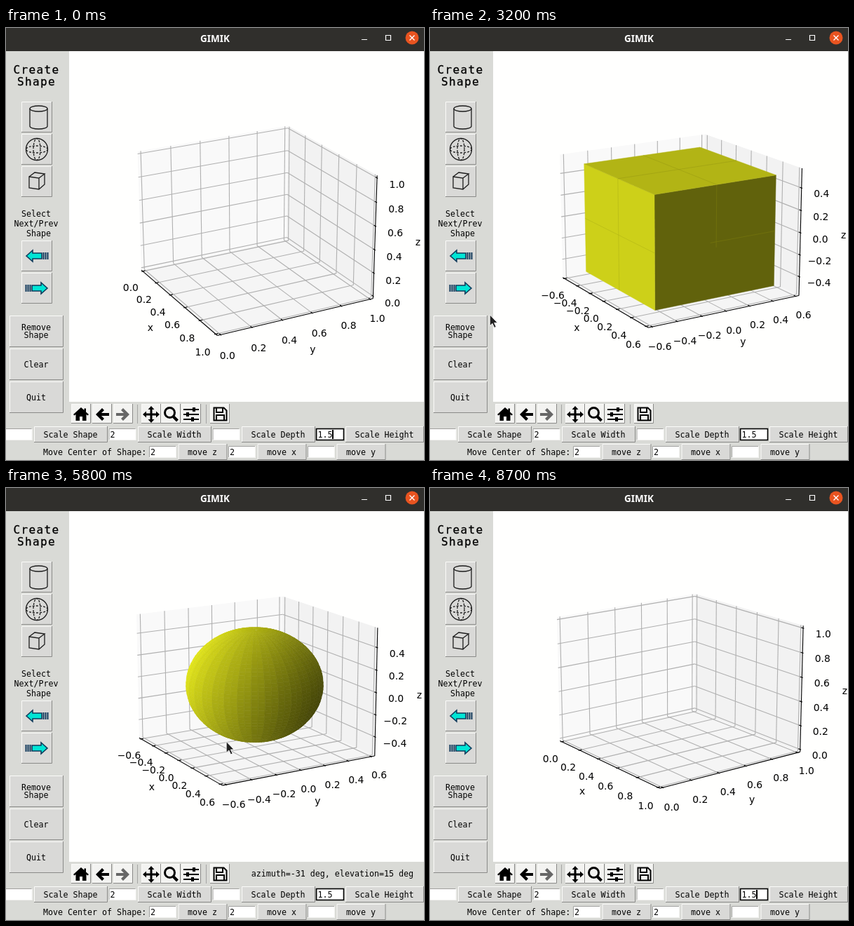
These frames come from a looping animation (596 px wide and 616 px high, 9100 ms). An HTML page with a canvas:

```html
<!DOCTYPE html>
<html lang="en">
<head>
<meta charset="utf-8">
<title>GIMIK</title>
<style>
  html, body { margin: 0; width: 100%; height: 100%; overflow: hidden; background: #d9dad6; }
  canvas, svg { position: absolute; left: 0; top: 0; }
  canvas { left: 90px; top: 33px; }
  text { font: 11.65px "DejaVu Sans Mono", monospace; white-space: pre; fill: #000; }
  .title { font: bold 13.5px "Noto Sans", sans-serif; fill: #fff; }
  .head { font-size: 16px; letter-spacing: 1.37px; stroke: #000; stroke-width: .3; }
  .icon { fill: none; stroke: #1c1c1c; stroke-width: 1.3; }
  .bold { fill: none; stroke: #000; stroke-width: 2; }
</style>
</head>
<body>
<canvas id="plot" width="506" height="500"></canvas>
<svg id="ui" width="596" height="616">
  <rect width="596" height="33" fill="#302f2c"/>
  <text class="title" x="298" y="20" text-anchor="middle">GIMIK</text>
  <path d="M507 16.5h8M541.5 10.5h7v7h-7z" fill="none" stroke="#fff" stroke-width="1.2"/>
  <circle cx="579" cy="14" r="9.5" fill="#e95420"/>
  <path d="M575.5 10.5l7 7m0-7l-7 7" stroke="#fff" stroke-width="1.4"/>
  <g id="widgets"></g>
  <g class="icon">
    <ellipse cx="46.5" cy="115" rx="12.5" ry="4"/>
    <path d="M34 115v25a12.5 4 0 0 0 25 0v-25"/>
    <circle cx="44" cy="173" r="15.5"/>
    <g stroke-dasharray="3 2">
      <ellipse cx="44" cy="173" rx="15.5" ry="5"/>
      <ellipse cx="44" cy="173" rx="5" ry="15.5"/>
    </g>
    <path d="M33 212l14 2v16l-14-2zl8-6 14 2-8 6m8-6v15l-8 7"/>
  </g>
  <g id="arrow" fill="#00e5d5" stroke="#123a5c" stroke-width="1.6">
    <path d="M29 325l9-8v4h13v8h-13v4z"/>
    <path d="M53.5 320v10m3-10v10m3-10v10" stroke-width="2"/>
  </g>
  <use href="#arrow" transform="matrix(-1 0 0 1 88 46)"/>
  <path d="M107 541l-11 10 1.5 1.5 2-1.5v9h5.5v-6h4v6h5.5v-9l2 1.5 1.5-1.5-4-3.6v-5h-2.5v2.7z"/>
  <path id="back" d="M128 551l9-9 3 3-4 4h11v4h-11l4 4-3 3z"/>
  <use href="#back" transform="matrix(-1 0 0 1 304 0)" fill="#666"/>
  <path d="M207 539l4.5 5h-3v5.5h5.5v-3l5 4.5-5 4.5v-3h-5.5v5.5h3l-4.5 5-4.5-5h3v-5.5h-5.5v3l-5-4.5 5-4.5v3h5.5v-5.5h-3z"/>
  <g class="bold">
    <circle cx="233.5" cy="548.5" r="7" stroke-width="3"/>
    <path d="M238.5 554l6 6" stroke-width="4"/>
    <path d="M253 544h22m-22 7h22m-22 7h22"/>
    <path d="M268 541v6m-9 1v6m7 1v6" stroke-width="4"/>
    <path d="M296.5 541.5h14l4 4v14h-18zM300 542v6h9v-6m-9 17v-7h11v7"/>
  </g>
  <path d="M187.5 537v27m98-27v27" stroke="#a5a5a3"/>
  <text id="status" x="581" y="554" text-anchor="end"></text>
  <rect id="caret" x="465" y="573" width="2" height="13"/>
  <path id="cursor" d="M0 0V16L3.7 12.6L6.4 18.6L9 17.4L6.3 11.6H11Z" fill="#222" stroke="#fff" stroke-width=".9"/>
</svg>
<script>
const $ = id => document.getElementById(id);
const LOOP = 9100, STEP = 100, OTHERS = [[1, 2], [0, 2], [0, 1]];

// ---------- widgets ----------
const buttons = [];
function add(tag, attrs, text = '') {
  const node = document.createElementNS('http://www.w3.org/2000/svg', tag);
  for (const key in attrs) node.setAttribute(key, attrs[key]);
  node.textContent = text;
  return $('widgets').appendChild(node);
}
function label(x, y, text, anchor = 'middle', cls = '') {
  add('text', { x, y, 'text-anchor': anchor, class: cls }, text);
}
function bevel(x, y, w, h, light, dark) {
  add('path', { d: `M${x + .5} ${y + h}V${y + .5}H${x + w}`, stroke: light, fill: 'none' });
  add('path', { d: `M${x} ${y + h - .5}H${x + w - .5}V${y}`, stroke: dark, fill: 'none' });
}
function button(x, y, w, h, lines = [], fill = '#d9d9d7') {
  const node = add('rect', { x, y, width: w, height: h, fill });
  bevel(x, y, w, h, '#fbfbf9', '#8a8a88');
  lines.forEach((s, i) => label(x + w / 2 - .5, y + h / 2 + 4 + (i - (lines.length - 1) / 2) * 11, s));
  buttons.push({ x, y, w, h, node, fill });
}
function entry(x, y, text) {
  add('rect', { x, y, width: 39, height: 17, fill: '#fff' });
  bevel(x, y, 39, 17, '#a0a09e', '#f2f2f0');
  label(x + 2, y + 13, text, 'start');
}
// Entry plus button pairs, side by side.
function controlRow(x, y, pitch, pairs) {
  pairs.forEach(([text, value], i) => {
    entry(x + i * pitch, y + 3, value);
    button(x + i * pitch + 41.5, y, 28 + 7 * text.length, 23, [text]);
  });
}

['Create', 'Shape'].forEach((s, i) => label(43.5, 65 + 17 * i, s, 'middle', 'head'));
['Select', 'Next/Prev', ' Shape'].forEach((s, i) => label(43, 269 + 14 * i, s));
for (const y of [105, 151, 197, 303, 349]) button(22, y, 44, 44);
[['Remove', 'Shape'], ['Clear'], ['Quit']].forEach((s, i) => button(5, 410 + 47 * i, 77, 45, s));
for (const x of [93, 123, 153, 193, 221, 250, 291]) button(x, 536, 28, 28, [], '#f3f3f1');
controlRow(-1.5, 568, 148, [['Scale Shape', ''], ['Scale Width', '2'], ['Scale Depth', ''], ['Scale Height', '1.5']]);
add('rect', { x: 442.5, y: 571.5, width: 39, height: 16, fill: 'none', stroke: '#000', 'stroke-width': 1.6 });
label(53, 609, 'Move Center of Shape:', 'start');
controlRow(204, 593, 113, [['move z', '2'], ['move x', '2'], ['move y', '']]);

// ---------- story ----------
// Each stroke: click a tool, then drag the plot from one point to another with some swing.
const CUBE = [44, 217], SPHERE = [44, 173], CLEAR = [42, 478];
const ENTER = [230, 215], EXIT = [211, 158];
const strokes = [
  { tool: CUBE, shape: 'cube', start: 1400, end: 2800, from: [314, 359], to: [321, 347], swing: [-6.5, -16] },
  { tool: CLEAR, shape: '', start: 4000, end: 4400, from: [301, 388], to: [298, 384], swing: [-1, -8.5] },
  { tool: SPHERE, shape: 'sphere', start: 5600, end: 6600, from: [313, 360], to: [324, 374], swing: [0, 0] },
  { tool: CLEAR, shape: '', start: 7600, end: 8200, from: [332, 405], to: [335, 395], swing: [2, 0] }
];
const DEG_PER_PX = 180 / 385;
const smooth = u => u * u * (3 - 2 * u);
const mix = (a, b, u, v = u) => [a[0] + (b[0] - a[0]) * u, a[1] + (b[1] - a[1]) * v];
const within = (v, a, b) => v >= a && v < b;

function dragPoint({ from, to, swing }, u) {
  const e = smooth(u), [x, y] = mix(from, to, e);
  return [x + swing[0] * Math.sin(2 * Math.PI * e), y + swing[1] * Math.sin(Math.PI * e)];
}
function travel(from, tool, to, u) {
  const turn = .55;
  if (u > turn) return mix(tool, to, smooth((u - turn) / (1 - turn)));
  u /= turn;
  return mix(from, tool, 1 - (1 - u) ** 2, u ** 1.5);
}
function sceneAt(t) {
  const scene = { az: -28.4, el: 22, shape: '', dragging: false };
  let last = { to: ENTER, end: 400 };
  for (const s of strokes) {
    if (t <= s.start) {
      scene.pointer = travel(last.to, s.tool, s.from, Math.max(0, (t - last.end) / (s.start - last.end)));
      return scene;
    }
    scene.pointer = dragPoint(s, Math.min(1, (t - s.start) / (s.end - s.start)));
    scene.az -= (scene.pointer[0] - s.from[0]) * DEG_PER_PX;
    scene.el += (scene.pointer[1] - s.from[1]) * DEG_PER_PX;
    scene.shape = s.shape;
    scene.dragging = t <= s.end;
    if (scene.dragging) return scene;
    last = s;
  }
  scene.pointer = mix(last.to, EXIT, smooth(Math.min(1, (t - last.end) / 400)));
  return scene;
}

// ---------- 3D plot ----------
const ctx = $('plot').getContext('2d');
ctx.translate(-90, -33);
const EDGE = .5 + 1 / 48, ASPECT = [8 / 7, 8 / 7, 6 / 7];
const ANCHOR = [[0, -EDGE, -EDGE], [EDGE, 0, -EDGE], [EDGE, EDGE, 0]];
const FAR = [-EDGE, EDGE, -EDGE];
const PANE = ['#f9f9f9', '#f2f2f2', '#f5f5f5'];
const RANGE = [1.21, 1.21, 1.1];
const LIGHT = [-2 / 3, -2 / 3, 1 / 3];
let view;

function setView(az, el) {
  const a = az * Math.PI / 180, e = el * Math.PI / 180;
  view = { ca: Math.cos(a), sa: Math.sin(a), ce: Math.cos(e), se: Math.sin(e) };
}
function project(p) {
  const { ca, sa, ce, se } = view;
  const [x, y, z] = p.map((v, i) => v * ASPECT[i]);
  const toward = x * ca + y * sa;
  const scale = 2081 / (10 - toward * ce - z * se);
  return [354.5 + (y * ca - x * sa) * scale, 280.3 - (z * ce - toward * se) * scale];
}
const put = (p, i, v) => p.map((c, k) => k === i ? v : c);
const outward = (p, axis, by) => p.map((v, i) => i === axis ? v : v + Math.sign(v) * by);
function trace(points) {
  ctx.beginPath();
  points.forEach(p => ctx.lineTo(...project(p)));
}
function line(a, b, color, width = 1.1) {
  trace([a, b]);
  ctx.strokeStyle = color;
  ctx.lineWidth = width;
  ctx.stroke();
}
function face(points, color, seam = 0) {
  trace(points);
  ctx.closePath();
  ctx.fillStyle = ctx.strokeStyle = color;
  ctx.fill();
  if (seam) { ctx.lineWidth = seam; ctx.stroke(); }
}
// Rectangle through `corner`, perpendicular to axis i.
function side(corner, i) {
  const [j, k] = OTHERS[i];
  return (u, v) => put(put(corner, j, u * corner[j]), k, v * corner[k]);
}
const outline = at => [at(1, 1), at(1, -1), at(-1, -1), at(-1, 1)];
function shade(normal, tone = 1) {
  const dot = normal.reduce((sum, v, i) => sum + v * LIGHT[i], 0);
  const k = (.3 + .35 * (1 + dot)) * tone;
  return `rgb(${232 * k},${235 * k},${28 * k})`;
}
function tickList(i, hasShape) {
  const count = hasShape && i < 2 ? 7 : hasShape ? 5 : 6;
  return Array.from({ length: count }, (_, n) => {
    const value = (hasShape ? n - (count - 1) / 2 : n) / 5;
    return { value, pos: hasShape ? value / RANGE[i] : value - .5 };
  });
}
function drawAxes(hasShape) {
  const axes = [0, 1, 2];
  const ticks = axes.map(i => tickList(i, hasShape));
  axes.forEach(i => face(outline(side(FAR, i)), PANE[i]));
  axes.forEach(i => ticks[i].forEach(({ pos }) => {
    const base = put(FAR, i, pos);
    for (const j of OTHERS[i]) line(base, put(base, j, -FAR[j]), '#b0b0b0');
  }));
  ctx.font = '13.89px "DejaVu Sans", sans-serif';
  ctx.textAlign = 'center';
  axes.forEach(i => {
    const anchor = ANCHOR[i], dir = i ? 0 : 1, sign = Math.sign(anchor[dir]);
    line(put(anchor, i, -EDGE), put(anchor, i, EDGE), '#000');
    ctx.fillStyle = '#000';
    for (const { value, pos } of ticks[i]) {
      const p = put(anchor, i, pos);
      line(put(p, dir, p[dir] + sign / 120), put(p, dir, p[dir] - sign / 60), '#000');
      const [x, y] = project(outward(p, i, .083));
      ctx.fillText(value.toFixed(1).replace('-', '\u2212'), x, y + 11.7);
    }
    const [x, y] = project(outward(anchor, i, .18));
    ctx.fillText('xyz'[i], x, y + 3.8);
  });
}
function drawCube() {
  const corner = RANGE.map((r, i) => (i === 1 ? -.5 : .5) / r);
  corner.forEach((c, i) => {
    const at = side(corner, i), normal = [0, 0, 0];
    normal[i] = Math.sign(c);
    face(outline(at), shade(normal), .5);
    const seam = shade(normal, i ? .87 : 1.25);
    line(at(0, 1), at(0, i ? -1 : -.1), seam, .6);
    line(at(i ? 1 : -1, 0), at(i ? -1 : .1, 0), seam, .6);
  });
}
function drawSphere() {
  const LON = 64, LAT = 48;
  const unit = (u, v) => {
    const a = u / LON * 2 * Math.PI, b = v / LAT * Math.PI;
    return [Math.cos(a) * Math.sin(b), Math.sin(a) * Math.sin(b), Math.cos(b)];
  };
  const at = (u, v) => unit(u, v).map((c, i) => c * .497 / RANGE[i]);
  for (let u = 0; u < LON; u++) for (let v = 0; v < LAT; v++) {
    const quad = [at(u, v), at(u, v + 1), at(u + 1, v + 1), at(u + 1, v)];
    const [a, , c, d] = quad.map(project);
    const area = (c[0] - a[0]) * (d[1] - b(a, c)[1]) - (c[1] - a[1]) * (d[0] - b(a, c)[0]);
    if (area < 0) face(quad, shade(unit(u + .5, v + .5), u % 2 ? 1 : .98), .6);
  }
  function b(p, q) { return mix(p, q, .5); }
}

// ---------- frame ----------
function statusText({ az, el, dragging, pointer: [x, y] }) {
  if (!within(x, 157, 542) || !within(y, 93, 478)) return '';
  if (dragging) return `azimuth=${Math.round(az)} deg, elevation=${Math.round(el)} deg`;
  const u = (x - 157) / 385, v = (478 - y) / 385;
  return `x=${u.toFixed(4)}, y=${v.toFixed(4)}, z=${(u * v).toFixed(4)}`;
}
function render(t) {
  const scene = sceneAt(t);
  setView(scene.az, scene.el);
  ctx.fillStyle = '#fffffe';
  ctx.fillRect(90, 33, 506, 500);
  drawAxes(scene.shape !== '');
  if (scene.shape === 'cube') drawCube();
  if (scene.shape === 'sphere') drawSphere();

  if (!within(t, 500, 8700)) scene.pointer = [-50, -50];
  const [x, y] = scene.pointer;
  $('cursor').setAttribute('transform', `translate(${x} ${y})`);
  $('status').textContent = statusText(scene);
  $('caret').style.display = (t + 600) % 900 < 300 ? 'none' : '';
  for (const b of buttons) {
    const over = within(x, b.x, b.x + b.w) && within(y, b.y, b.y + b.h);
    b.node.setAttribute('fill', over ? '#ececea' : b.fill);
  }
}
let shown = -1;
function tick() {
  const t = Math.floor(performance.now() % LOOP / STEP) * STEP;
  if (t !== shown) render(shown = t);
  requestAnimationFrame(tick);
}
tick();
</script>
</body>
</html>
```
